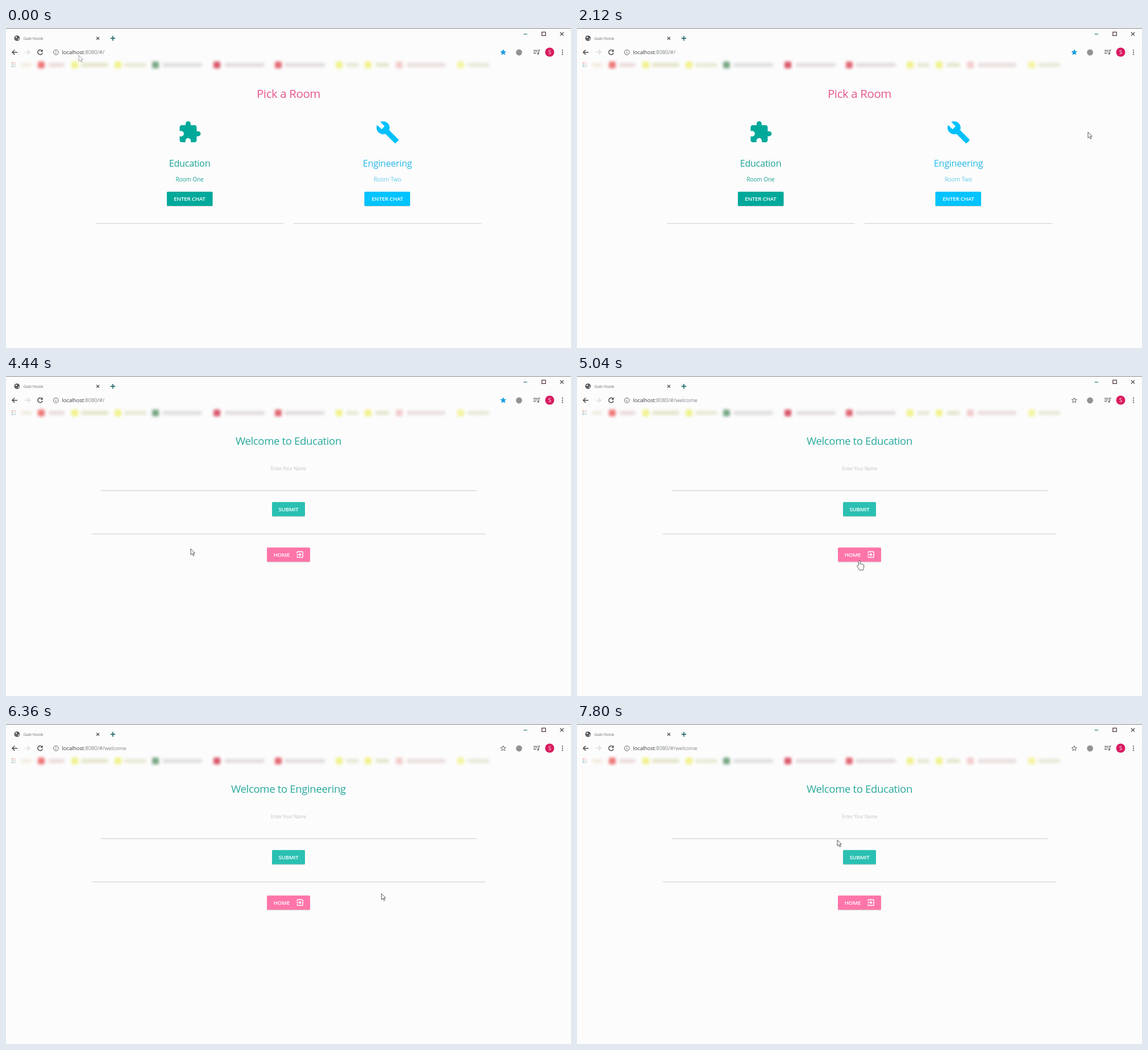
Animation, 994 px wide and 563 px high, one loop 8000 ms. Source, as an HTML page:

```html
<!DOCTYPE html>
<html lang="en">
<head>
<meta charset="utf-8">
<title>Room picker</title>
<style>
html, body { margin: 0; width: 100%; height: 100%; overflow: hidden; background: #fcfcfc; }
svg { display: block; width: 100vw; height: 100vh; }
text { font-family: "Open Sans", "Noto Sans", sans-serif; letter-spacing: -.02em; }
.mid { text-anchor: middle; }
.label { font-size: 9.7px; font-weight: 600; fill: #fff; }
.line { fill: none; stroke: #444; stroke-width: 1.2; }
.rule { stroke: #c9c9c9; stroke-width: 1; }
.face { fill: #fff; stroke: #444; stroke-width: .9; stroke-linejoin: round; }
</style>
</head>
<body>
<svg viewBox="0 0 994 563">
  <defs>
    <filter id="soft" x="-5%" y="-200%" width="110%" height="500%"><feGaussianBlur stdDeviation="2.6"/></filter>
    <filter id="shade" x="-10%" y="-20%" width="120%" height="150%">
      <feDropShadow dx="0" dy=".8" stdDeviation=".7" flood-opacity=".22"/>
    </filter>
  </defs>
  <rect width="994" height="563" fill="#fcfcfc"/>
  <path d="M0 .5H994" stroke="#858585"/>

  <!-- Tab strip and window controls -->
  <circle cx="19.3" cy="18" r="4.8" fill="#505357"/>
  <path d="M16 16.5l2.5-1.8 1.2 1.5-1.5 2zM20.5 20l2-2.5.6 1.5-1.8 2.4zM16.6 20l1.4.4.3 1.5z" fill="#e8e8e8"/>
  <text x="30.5" y="20.8" font-size="7.8" fill="#70757a">Gab Nook</text>
  <g class="line">
    <path d="M159.2 15.7l4.8 4.8m0-4.8l-4.8 4.8"/>
    <path d="M188 14v8.4M183.8 18.2h8.4" stroke="#286c70" stroke-width="1.7"/>
    <path d="M910.5 10.8h6.5" stroke="#26787c"/>
    <rect x="942.8" y="7.2" width="6.4" height="6.2" stroke="#4b3037"/>
    <path d="M974.8 7.5l6.2 6.2m0-6.2l-6.2 6.2"/>
    <path d="M20 42.7H11m4.2-4.2L11 42.7l4.2 4.2" stroke-width="1.4"/>
    <path d="M33 42.7h9m-4.2-4.2l4.2 4.2-4.2 4.2" stroke="#d5d5d5"/>
    <path d="M63.2 39.8a4.2 4.2 0 1 0 1 3.7" stroke-width="1.4"/>
    <circle cx="87.8" cy="42.8" r="4.4" stroke="#666" stroke-width="1"/>
    <path d="M87.8 42v3.3M87.8 39.9v1.1" stroke="#666" stroke-width="1"/>
    <path d="M928 39.4h7.5M928 42h7.5M928 44.7h4.5M937.3 45V38.8h2.4" stroke="#626262"/>
    <circle cx="936" cy="45.4" r="1.4" fill="#626262" stroke="none"/>
  </g>
  <path d="M64.6 37.6v4.2h-4.2z" fill="#444"/>
  <text x="98.5" y="46" font-size="9.6" fill="#80868b"><tspan fill="#3c4043">localhost</tspan><tspan id="path"></tspan></text>
  <path id="star" stroke-width="1" stroke-linejoin="round"/>
  <circle cx="902.6" cy="43" r="5.4" fill="#929292"/>
  <circle cx="956.5" cy="42.5" r="8" fill="#d81b60"/>
  <text class="mid" x="956.4" y="46" font-size="9.3" fill="#fff">S</text>
  <g fill="#555"><circle cx="979" cy="39" r="1.1"/><circle cx="979" cy="42.7" r="1.1"/><circle cx="979" cy="46.4" r="1.1"/></g>
  <g id="dots"></g>
  <g id="marks" filter="url(#soft)"></g>

  <g id="rooms">
    <text class="mid" x="497" y="122.8" font-size="20.5" fill="#e8578f">Pick a Room</text>
    <path transform="translate(302 162.3) scale(1.76)" fill="#00a99a" d="M20.5 11H19V7c0-1.1-.9-2-2-2h-4V3.5C13 2.12 11.88 1 10.5 1S8 2.12 8 3.5V5H4c-1.1 0-2 .9-2 2v3.8h1.5c1.49 0 2.7 1.21 2.7 2.7s-1.21 2.7-2.7 2.7H2V20c0 1.1.9 2 2 2h3.8v-1.5c0-1.49 1.21-2.7 2.7-2.7s2.7 1.21 2.7 2.7V22H17c1.1 0 2-.9 2-2v-4h1.5c1.38 0 2.5-1.12 2.5-2.5S21.88 11 20.5 11z"/>
    <path transform="translate(650.2 162.3) scale(1.76)" fill="#00c0fc" d="M22.7 19l-9.1-9.1c.9-2.3.4-5-1.5-6.9-2-2-5-2.4-7.4-1.3L9 6 6 9 1.6 4.7C.4 7.1.9 10.1 2.9 12.1c1.9 1.9 4.6 2.4 6.9 1.5l9.1 9.1c.4.4 1 .4 1.4 0l2.3-2.3c.5-.4.5-1.1.1-1.4z"/>
    <g fill="#1da394">
      <text class="mid" x="323" y="244.3" font-size="16.3">Education</text>
      <text class="mid" x="323" y="270.3" font-size="10.2">Room One</text>
    </g>
    <g fill="#2bb9e6">
      <text class="mid" x="671" y="244.3" font-size="16.3">Engineering</text>
      <text class="mid" x="671" y="270.3" font-size="10.2" fill="#65cbe9">Room Two</text>
    </g>
    <path class="rule" d="M158 344H488M506 344H836"/>
  </g>

  <g id="welcome">
    <text id="greeting" class="mid" x="497" y="120.5" font-size="18.6" fill="#29a99c"></text>
    <text class="mid" x="497" y="166.4" font-size="8.1" fill="#c4c4c4">Enter Your Name</text>
    <path class="rule" d="M166.5 201.8H828M151 277.8H843.5"/>
  </g>

  <g id="cursor"><path id="arrow" class="face" d="M0 0V10.6L2.6 8.3 4.3 12.2 6 11.4 4.3 7.7H7.4Z"/>
    <path id="hand" class="face" d="M-1.4 8V1.4a1.4 1.4 0 0 1 2.8 0V6c.6-.8 2-.6 2.3.4.6-.7 1.9-.4 2.1.5.8-.5 1.9 0 1.9 1.2V11c0 2-1 3-1.3 5.3H-.5C-1 14-3.4 11.5-4.2 9.6c-.4-1.2 1-1.9 1.8-1z"/></g>
</svg>
<script>
const LOOP = 8000, STEP = 40;
const $ = id => document.getElementById(id);

function add(parent, tag, attrs, text = '') {
  const el = document.createElementNS('http://www.w3.org/2000/svg', tag);
  for (const key in attrs) el.setAttribute(key, attrs[key]);
  el.textContent = text;
  return parent.appendChild(el);
}

// Buttons: page, x, y, width, fill, label, label centre
const buttons = [
  ['rooms', 283, 288, 80.5, '#00a99a', 'ENTER CHAT', 323],
  ['rooms', 630.5, 288, 80.5, '#00c3ff', 'ENTER CHAT', 671],
  ['welcome', 468, 221.8, 58, '#2bc0b2', 'SUBMIT', 497],
  ['welcome', 459, 301.8, 76, '#fe74a9', 'HOME', 485]
];
for (const [page, x, y, width, fill, label, cx] of buttons) {
  add($(page), 'rect', { x, y, width, height: 25, rx: 1.5, fill, filter: 'url(#shade)' });
  add($(page), 'text', { x: cx, y: y + 16, class: 'mid label' }, label);
}
add($('welcome'), 'path', {
  d: 'M512.3 312V310.3a1.2 1.2 0 0 1 1.2-1.2h7.4a1.2 1.2 0 0 1 1.2 1.2v7.8a1.2 1.2 0 0 1-1.2 1.2h-7.4a1.2 1.2 0 0 1-1.2-1.2v-1.7M511.5 314.2h7.2m-2.4-2.5l2.5 2.5-2.5 2.5',
  fill: 'none', stroke: '#fff', 'stroke-width': 1.5
});

// Blurred bookmarks: icon x, text start, text end, icon colour, text colour
const marks = [
  [62, 75, 103, '#ef7777', '#eadada'], [121, 132, 180, '#f1f28c', '#e4e4ca'],
  [197, 208, 247, '#f1f28c', '#e8e8d4'], [263, 275, 345, '#78a785', '#dedede'],
  [371, 385, 455, '#d9566b', '#e3dcdc'], [479, 490, 561, '#e26673', '#e2dcdc'],
  [586, 598, 620, '#f1f28c', '#e7e7d4'], [637, 650, 674, '#f1f28c', '#e4e5cc'],
  [692, 705, 773, '#f3cccc', '#eadddd'], [800, 812, 850, '#f3f4a0', '#e7e7d6']
];
const smear = (x, width, height, fill) =>
  add($('marks'), 'rect', { x, y: 65 - height / 2, width, height, rx: 3, fill });
smear(26, 19, 6, '#f2eadd');
for (const [x, from, to, icon, ink] of marks) {
  smear(x - 6, 12, 12, icon);
  smear(from, to - from, 7, ink);
}
['#d96a62', '#7fae8a', '#6f8fc4'].forEach((fill, row) => {
  for (let col = 0; col < 3; col++)
    add($('dots'), 'rect', { x: 10 + col * 2.8, y: 60.5 + row * 3.2, width: 1.7, height: 1.7, fill, opacity: col ? .45 : .9 });
});

const tips = Array.from({ length: 10 }, (_, i) => {
  const r = i % 2 ? 2.1 : 4.8, a = i * Math.PI / 5;
  return (874.8 + r * Math.sin(a)).toFixed(2) + ' ' + (42.9 - r * Math.cos(a)).toFixed(2);
});
$('star').setAttribute('d', 'M' + tips.join('L') + 'Z');

// Pointer stops: time, x, y
const stops = [
  [0, 128, 48], [1760, 128, 48], [1920, 500, 112], [2120, 899, 183], [2480, 899, 183], [2640, 970, 262],
  [2720, 894, 400], [2840, 820, 417], [3080, 540, 380], [3360, 303, 329], [3520, 299, 294],
  [3640, 299, 294], [4000, 325, 304], [4760, 325, 304], [4900, 420, 329], [5040, 497, 325],
  [5160, 502, 318], [5360, 585, 305], [5600, 666, 290], [5720, 668, 296], [6320, 668, 296],
  [6520, 570, 322], [6720, 492, 316], [6840, 473, 317], [6920, 458, 315], [7080, 458, 315],
  [7320, 340, 302], [7440, 340, 302], [7800, 458, 204], [8000, 458, 204]
];

// Slope at a stop; zero where the pointer rests on either side
function slope(i, k) {
  const a = stops[i - 1], b = stops[i], c = stops[i + 1];
  if (!a || !c || a[k] === b[k] || b[k] === c[k]) return 0;
  return (c[k] - a[k]) / (c[0] - a[0]);
}

function pointer(t) {
  const i = stops.findIndex((s, n) => n === stops.length - 1 || t < stops[n + 1][0]);
  const a = stops[i], b = stops[i + 1] || a;
  const span = b[0] - a[0] || 1, u = (t - a[0]) / span, v = 1 - u;
  return [1, 2].map(k =>
    v * v * (1 + 2 * u) * a[k] + u * u * (3 - 2 * u) * b[k] +
    u * v * span * (v * slope(i, k) - u * slope(i + 1, k)));
}

const visits = [[4440, 5160, 'Education'], [5760, 6800, 'Engineering'], [7440, LOOP, 'Education']];
const visitAt = t => visits.find(([from, to]) => t >= from && t < to);
const show = (id, on) => $(id).setAttribute('visibility', on ? 'visible' : 'hidden');

function draw(t) {
  const visit = visitAt(t), page = visit ? 'welcome' : 'rooms';
  show('rooms', !visit);
  show('welcome', visit);
  if (visit) $('greeting').textContent = 'Welcome to ' + visit[2];

  // The address bar trails the page by a moment
  const away = visitAt(t - 60);
  $('path').textContent = ':8080/#/' + (away ? 'welcome' : '');
  $('star').setAttribute('fill', away ? 'none' : '#1a9be0');
  $('star').setAttribute('stroke', away ? '#666' : '#1a9be0');

  const [x, y] = pointer(t);
  const over = buttons.some(([p, bx, by, w]) => p === page && x >= bx && x <= bx + w && y >= by && y <= by + 25);
  const seen = t < 2600 || t >= 2760;
  $('cursor').setAttribute('transform', `translate(${x.toFixed(1)} ${y.toFixed(1)})`);
  $('cursor').setAttribute('opacity', t < 1800 ? .55 : 1);
  show('arrow', seen && !over);
  show('hand', seen && over);
}

const start = performance.now();
function tick() {
  const t = (performance.now() - start) % LOOP;
  draw(Math.floor(t / STEP) * STEP);
  requestAnimationFrame(tick);
}
tick();
</script>
</body>
</html>
```
